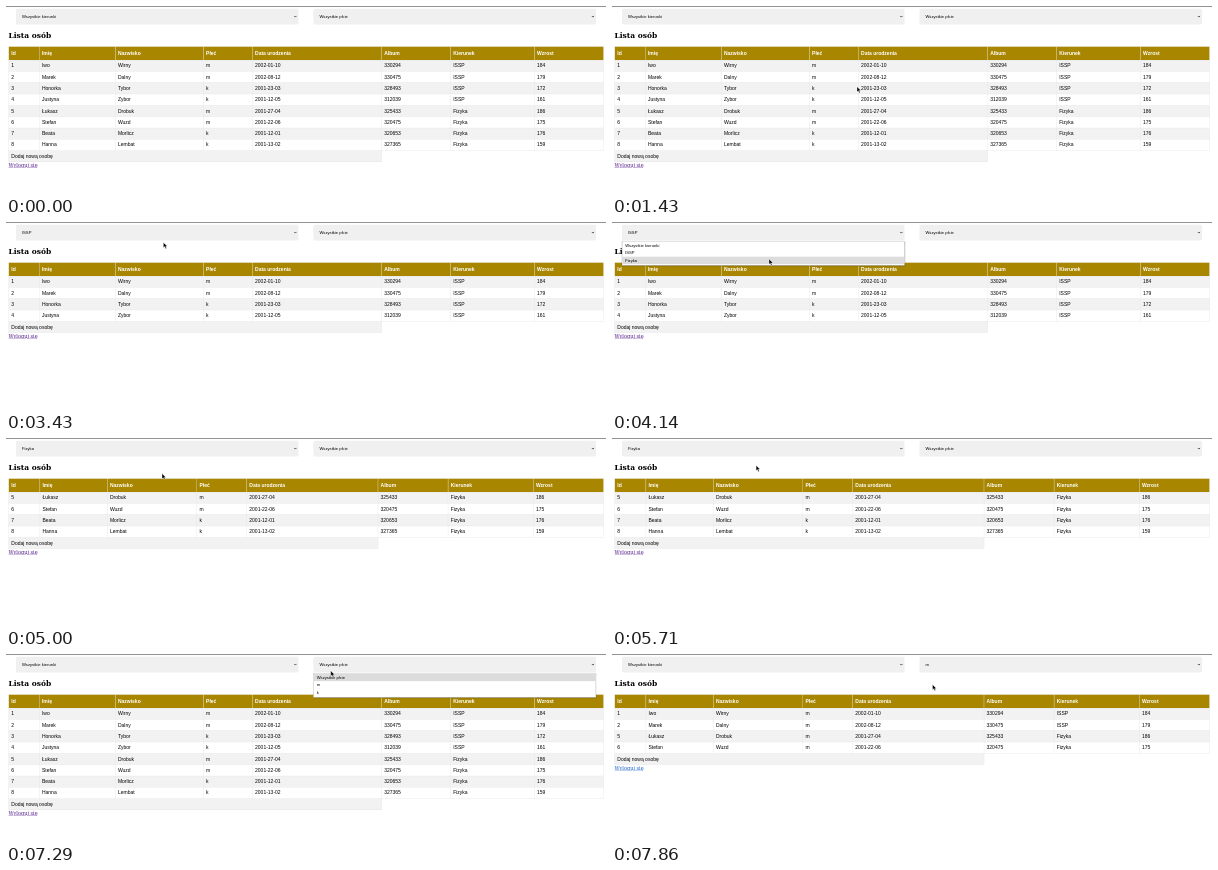
Recreate the animation shown at these times as an HTML page. Size 600 by 188 pixels, loop 8 s.

```html
<!DOCTYPE html>
<html lang="pl">
<head>
<meta charset="utf-8">
<title>Lista osób</title>
<style>
html, body { margin: 0; width: 100%; height: 100%; overflow: hidden; background: #fff; }
#page {
  position: absolute; left: 0; top: 0; width: 1920px; height: 602px; overflow: hidden;
  transform: scale(.3125); transform-origin: 0 0;
  background: #fff; color: #000; font: 16px "Liberation Sans", Arial, sans-serif;
}
#page * { box-sizing: border-box; white-space: nowrap; }
#edge { position: absolute; width: 100%; height: 3px; background: #8c8c8c; }
.select {
  position: absolute; top: 9px; width: 904px; height: 50px; padding-left: 19px;
  background: #f0f0f0; border-radius: 4px; font-size: 13.333px; line-height: 50px;
}
.select svg { position: absolute; right: 5px; top: 21px; }
.menu {
  position: absolute; top: 61px; width: 904px; padding: 1px 0 3px;
  background: #fff; border: 1px solid #aaa; box-shadow: 1px 2px 4px #0006;
  font-size: 13.333px;
}
.menu div { height: 24px; line-height: 24px; padding-left: 9px; }
.menu .on { background: #dcdcdc; }
h1 { position: absolute; left: 8px; top: 74px; margin: 0; font: bold 24px/38px "DejaVu Serif", serif; }
#list { position: absolute; left: 8px; top: 129px; width: 1904px; }
table { width: 100%; border-collapse: collapse; }
th, td { height: 36.2px; padding: 0 8px; border: 1px solid #ddd; text-align: left; }
th { height: 43.5px; background: #a88600; color: #fff; }
tr:nth-child(even) td { background: #f2f2f2; }
#logout { font: 16px/21px "DejaVu Serif", serif; text-decoration: underline; }
#cursor { position: absolute; left: 0; top: 0; overflow: visible; }
</style>
</head>
<body>
<div id="page">
  <div id="edge"></div>
  <h1>Lista osób</h1>
  <div id="list"></div>
  <div id="controls"></div>
  <svg id="cursor" width="16" height="24"><path d="M0 0V17L4 13.5L7 20L10 18.7L7.2 12.5H12.5Z" fill="#000" stroke="#fff" stroke-width="1.2"/></svg>
</div>
<script>
const SCALE = .3125, STEP = 1000 / 7, FRAMES = 56;
const MENU_TOP = 19.7, ITEM_HEIGHT = 7.5;
const HEAD = ["Id", "Imię", "Nazwisko", "Płeć", "Data urodzenia", "Album", "Kierunek", "Wzrost"];
const PEOPLE = `Iwo Wirny m 2002-01-10 330294 ISSP 184
Marek Dalny m 2002-08-12 330475 ISSP 179
Honorka Tybor k 2001-23-03 328493 ISSP 172
Justyna Zybor k 2001-12-05 312039 ISSP 161
Łukasz Drobuk m 2001-27-04 325433 Fizyka 186
Stefan Wuzd m 2001-22-06 320475 Fizyka 175
Beata Morlicz k 2001-12-01 320653 Fizyka 176
Hanna Lembat k 2001-13-02 327365 Fizyka 159`.split("\n").map((line, i) => [i + 1, ...line.split(" ")]);
const SELECTS = [
  { left: 32, column: 6, options: ["Wszystkie kierunki", "ISSP", "Fizyka"] },
  { left: 984, column: 3, options: ["Wszystkie płcie", "m", "k"] }
];
// Pointer key points: step, x, y, and whether it clicks there
const CLICK = true;
const PATH = [
  [8, 262, 96], [16, 194, 34.5],
  [18, 162, 14, CLICK], [21, 158, 30, CLICK],
  [26, 157, 14, CLICK], [29, 157, 37], [32, 157, 37, CLICK],
  [35, 156, 35.5], [43, 137, 22.5],
  [44, 135, 14, CLICK], [46, 135, 23, CLICK],
  [50, 326, 12, CLICK], [54, 321, 31, CLICK], [56, 320, 30]
];

const $ = id => document.getElementById(id);
const row = (values, tag) => `<tr>${values.map(v => `<${tag}>${v}</${tag}>`).join("")}</tr>`;

function drawList(chosen) {
  const matches = person => SELECTS.every(({ column, options }, i) =>
    !chosen[i] || person[column] === options[chosen[i]]);
  $("list").innerHTML = `<table>${row(HEAD, "th")}
    ${PEOPLE.filter(matches).map(p => row(p, "td")).join("")}
    <tr><td colspan="5">Dodaj nową osobę</td></tr></table>
    <div id="logout" style="color:${chosen[1] ? "#1a5fc8" : "#551a8b"}">Wyloguj się</div>`;
}

function drawControls({ chosen, open, hover }) {
  $("controls").innerHTML = SELECTS.map(({ left, options }, i) => {
    const items = options.map((o, k) => `<div class="${k === hover ? "on" : ""}">${o}</div>`).join("");
    return `<div class="select" style="left:${left}px">${options[chosen[i]]}
      <svg width="10" height="8"><path d="M1 1.5L5 5.5L9 1.5" fill="none" stroke="#000" stroke-width="2"/></svg></div>` +
      (i === open ? `<div class="menu" style="left:${left}px">${items}</div>` : "");
  }).join("");
}

function pointerAt(step) {
  const i = PATH.findIndex(p => p[0] > step);
  const [s0, x0, y0] = PATH[i - 1], [s1, x1, y1] = PATH[i];
  const k = (step - s0) / (s1 - s0);
  return [x0 + (x1 - x0) * k, y0 + (y1 - y0) * k];
}

const itemAt = y => Math.floor((y - MENU_TOP) / ITEM_HEIGHT);

// A click opens the select under the pointer, the next one picks the item under it
function stateAt(step, pointer) {
  const chosen = [0, 0];
  let open = -1;
  for (const [s, x, y, click] of PATH) {
    if (!click || s > step) continue;
    if (open < 0) open = x < 300 ? 0 : 1;
    else {
      chosen[open] = itemAt(y);
      open = -1;
    }
  }
  let hover = -1;
  if (open >= 0) {
    const item = itemAt(pointer[1]);
    hover = item < 0 ? chosen[open] : item;
  }
  return { chosen, open, hover };
}

let shown;
function render(time) {
  const step = Math.floor(time / STEP + .03) % FRAMES;
  if (step === shown) return;
  shown = step;
  const pointer = step < PATH[0][0] ? null : pointerAt(step);
  const state = stateAt(step, pointer);
  drawList(state.chosen);
  drawControls(state);
  $("cursor").style.display = pointer ? "" : "none";
  if (pointer) {
    const [x, y] = pointer.map(v => v / SCALE);
    $("cursor").style.transform = `translate(${x}px, ${y}px)`;
  }
}

const start = performance.now();
function tick() {
  render(performance.now() - start);
  requestAnimationFrame(tick);
}
tick();
</script>
</body>
</html>
```
